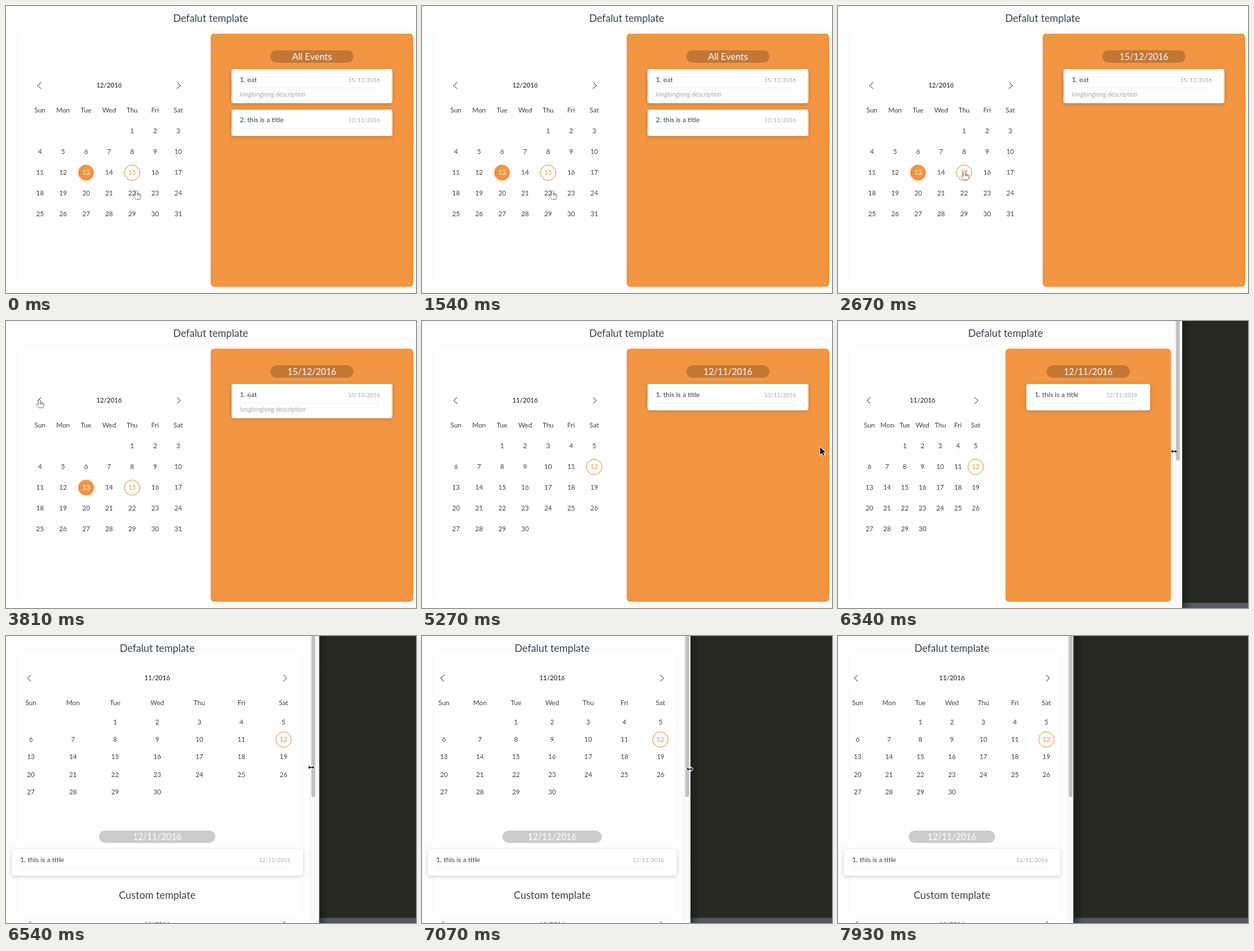
Animation of 591x415 px, one loop 8 s. Source, as an HTML page with a canvas:

```html
<!DOCTYPE html>
<html lang="en">
<head>
<meta charset="utf-8">
<title>Event calendar</title>
<style>
  html, body { margin: 0; width: 100%; height: 100%; overflow: hidden; background: #fdfdfd; }
  canvas { display: block; }
</style>
</head>
<body>
<canvas id="stage" width="591" height="415"></canvas>
<script>
const WIDTH = 591, HEIGHT = 415, LOOP = 8000, STEP = 66.67;
const ORANGE = '#f29543', INK = '#36434f', PALE = '#a9a9a9';
const DAYS = ['Sun', 'Mon', 'Tue', 'Wed', 'Thu', 'Fri', 'Sat'];
const PICK_DEC = 2530, TO_NOVEMBER = 3860, PICK_NOV = 4460;
const BREAKPOINT = 225;
const ctx = document.getElementById('stage').getContext('2d');

// [time, page centre, window edge]: the layout lags behind the dragged edge
const WINDOW = [
  [5400, 295, 601], [6000, 290, 591], [6133, 265, 541],
  [6533, 218, 451.7], [7067, 187.6, 387], [7730, 164.2, 339.4]
];
// [time, x, y]
const POINTER = [
  [1540, 188, 267], [2300, 182, 239], [2670, 182, 239], [3200, 48, 113.5],
  [3870, 48, 113.5], [4070, 150, 170], [4360, 247, 208], [4760, 247, 208],
  [5070, 545, 180], [5210, 545, 180], [5330, 606, 185], [5600, 606, 185],
  [6000, 584, 186], [6133, 529, 187], [6533, 440, 190], [7067, 386, 192.5], [7730, 340, 193]
];
const HAND = new Path2D('M-1.2 .8Q0-.8 1.2 .8V4.4L5.2 5.4Q6.6 5.8 6.4 7.4L5.3 12H-.6L-3.8 8Q-4.2 6.4-2.8 6.5L-1.2 7.8Z');
const ARROW = new Path2D('M0 0V11L2.6 8.6 4.4 12.4 6 11.6 4.3 8H7.8Z');
const RESIZE = new Path2D('M-4.5 0L-2-2.6V-.8H2V-2.6L4.5 0 2 2.6V.8H-2V2.6Z');

function track(keys, t) {
  const next = keys.findIndex(key => key[0] > t);
  if (next === 0) return keys[0].slice(1);
  if (next < 0) return keys[keys.length - 1].slice(1);
  const a = keys[next - 1], b = keys[next], k = (t - a[0]) / (b[0] - a[0]);
  return a.slice(1).map((v, i) => v + (b[i + 1] - v) * k);
}

function text(str, x, y, size, color = INK, align = 'center', weight = 400) {
  ctx.font = `${weight} ${size}px Lato, sans-serif`;
  ctx.fillStyle = color;
  ctx.textAlign = align;
  ctx.fillText(str, x, y + size * 0.36);
}

function box(left, top, right, bottom, color, radius = 0) {
  ctx.fillStyle = color;
  ctx.beginPath();
  ctx.roundRect(left, top, right - left, bottom - top, radius);
  ctx.fill();
}

function chevron(x, y, dir) {
  ctx.strokeStyle = INK;
  ctx.lineWidth = 1;
  ctx.beginPath();
  ctx.moveTo(x - 2.5 * dir, y - 4.7);
  ctx.lineTo(x + 2.5 * dir, y);
  ctx.lineTo(x - 2.5 * dir, y + 4.7);
  ctx.stroke();
}

function monthBar(label, first, last, y) {
  chevron(first, y, -1);
  chevron(last, y, 1);
  text(label, (first + last) / 2, y, 9.4, '#1c2b3a', 'center', 500);
}

function calendar(c, wide, november) {
  const left = wide ? 32.4 : 5.5;
  const cell = (wide ? c - 62.6 : 2 * c - 11) / 7;
  const [barY, namesY, rowY, rowStep, gap] = wide ? [115, 151, 181, 30, 0.8] : [61, 97, 124.5, 25.2, 2.2];
  const colX = i => left + cell * (i + 0.5);
  const month = november
    ? { label: '11/2016', start: 2, length: 30, event: 12 }
    : { label: '12/2016', start: 4, length: 31, event: 15, today: 13 };

  monthBar(month.label, colX(0) - gap, colX(6) + gap, barY);
  DAYS.forEach((name, i) => text(name, colX(i), namesY, 9.6));
  for (let day = 1; day <= month.length; day++) {
    const slot = day + month.start - 1;
    const x = colX(slot % 7), y = rowY + rowStep * Math.floor(slot / 7);
    let color = INK;
    if (day === month.today || day === month.event) {
      ctx.beginPath();
      ctx.arc(x, y, 11.1, 0, 7);
      ctx.fillStyle = ctx.strokeStyle = ORANGE;
      ctx.lineWidth = 1;
      if (day === month.today) ctx.fill();
      ctx.stroke();
      color = day === month.today ? '#fff' : ORANGE;
    }
    text(day, x, y, 9.5, color);
  }
}

function card(left, right, top, title, date, description) {
  ctx.save();
  ctx.shadowColor = 'rgba(0,0,0,.2)';
  ctx.shadowBlur = 5;
  ctx.shadowOffsetY = 1.2;
  box(left, top, right, top + (description ? 49.5 : 38.3), '#fff', 3);
  ctx.restore();
  text(title, left + 12, top + 15, 10, INK, 'left');
  text(date, right - 18, top + 15.8, 8.2, PALE, 'right');
  box(left + 12, top + 27, right - 18, top + 27.7, '#efefef');
  if (description) text(description, left + 12, top + 37, 8.8, PALE, 'left');
}

function events(c, wide, t) {
  const [left, right, top] = wide ? [c + 30, 2 * c - 33, 91] : [8.5, 2 * c - 8, 308.3];
  const middle = wide ? 1.5 * c - 1.5 : c;
  const half = wide ? 60 : 0.2 * (2 * c - 17);
  const pillY = wide ? 73 : 290.2;
  if (wide) box(c, 40, 2 * c - 3, 406, ORANGE, 5);
  box(middle - half, pillY - 9, middle + half, pillY + 9, 'rgba(0,0,0,.2)', 9);

  const heading = t < PICK_DEC ? 'All Events' : t < PICK_NOV ? '15/12/2016' : '12/11/2016';
  text(heading, middle, pillY, t < PICK_DEC ? 13.3 : 12.7, '#fff');
  if (t < PICK_NOV) card(left, right, top, '1. eat', '15/12/2016', 'longlonglong description');
  if (t < PICK_DEC) card(left, right, top + 58.7, '2. this is a title', '12/11/2016');
  if (t >= PICK_NOV) card(left, right, top, '1. this is a title', '12/11/2016');
}

function browserEdge(c, edge, wide) {
  box(2 * c + 2.5, 0, edge, HEIGHT, '#fafafa');
  box(2 * c + 2.5, 0, 2 * c + 3, HEIGHT, '#e6e6e6');
  box(2 * c + 4.3, -6, 2 * c + 9.8, wide ? 202 : 233, '#c1c1c1', 3);
  if (edge >= WIDTH) return;
  box(edge, 0, WIDTH, HEIGHT, '#272822');
  box(edge, 407.5, WIDTH, HEIGHT, '#565a60');
  const shade = ctx.createLinearGradient(edge, 0, edge + 14, 0);
  shade.addColorStop(0, 'rgba(16,24,20,.5)');
  shade.addColorStop(1, 'rgba(16,24,20,0)');
  box(edge, 0, edge + 14, HEIGHT, shade);
}

function pointer(t) {
  if (t >= 7780) return;
  const [x, y] = track(POINTER, t);
  const shape = t < 4780 ? HAND : t < 5330 ? ARROW : RESIZE;
  const hand = shape === HAND;
  ctx.save();
  ctx.translate(x, y);
  ctx.lineJoin = 'round';
  ctx.lineWidth = hand ? 1 : 1.6;
  ctx.strokeStyle = hand ? '#222' : '#fff';
  ctx.fillStyle = hand ? '#fff' : '#111';
  ctx.stroke(shape);
  ctx.fill(shape);
  if (hand) {
    ctx.lineWidth = 0.6;
    ctx.stroke(new Path2D('M1.2 4.5V7M3 5V7M4.8 5.4V7'));
  }
  ctx.restore();
}

function draw(t) {
  const [c, edge] = track(WINDOW, t);
  const wide = c > BREAKPOINT;
  box(0, 0, WIDTH, HEIGHT, '#fdfdfd');
  box(18, wide ? 38 : 24, 2 * c - 12, 404, '#fff', 8);
  text('Defalut template', c, 17.5, 14.6);
  calendar(c, wide, t >= TO_NOVEMBER);
  events(c, wide, t);
  if (!wide) {
    const inset = (2 * c - 11) / 14 + 3.3;
    text('Custom template', c, 374.5, 14.7);
    monthBar('11/2016', inset, 2 * c - inset, 417.3);
  }
  browserEdge(c, edge, wide);
  pointer(t);
}

const start = performance.now();
function frame() {
  const t = (performance.now() - start) % LOOP;
  draw(Math.min(119, Math.floor((t + 5) / STEP)) * STEP);
  requestAnimationFrame(frame);
}
frame();
</script>
</body>
</html>
```
